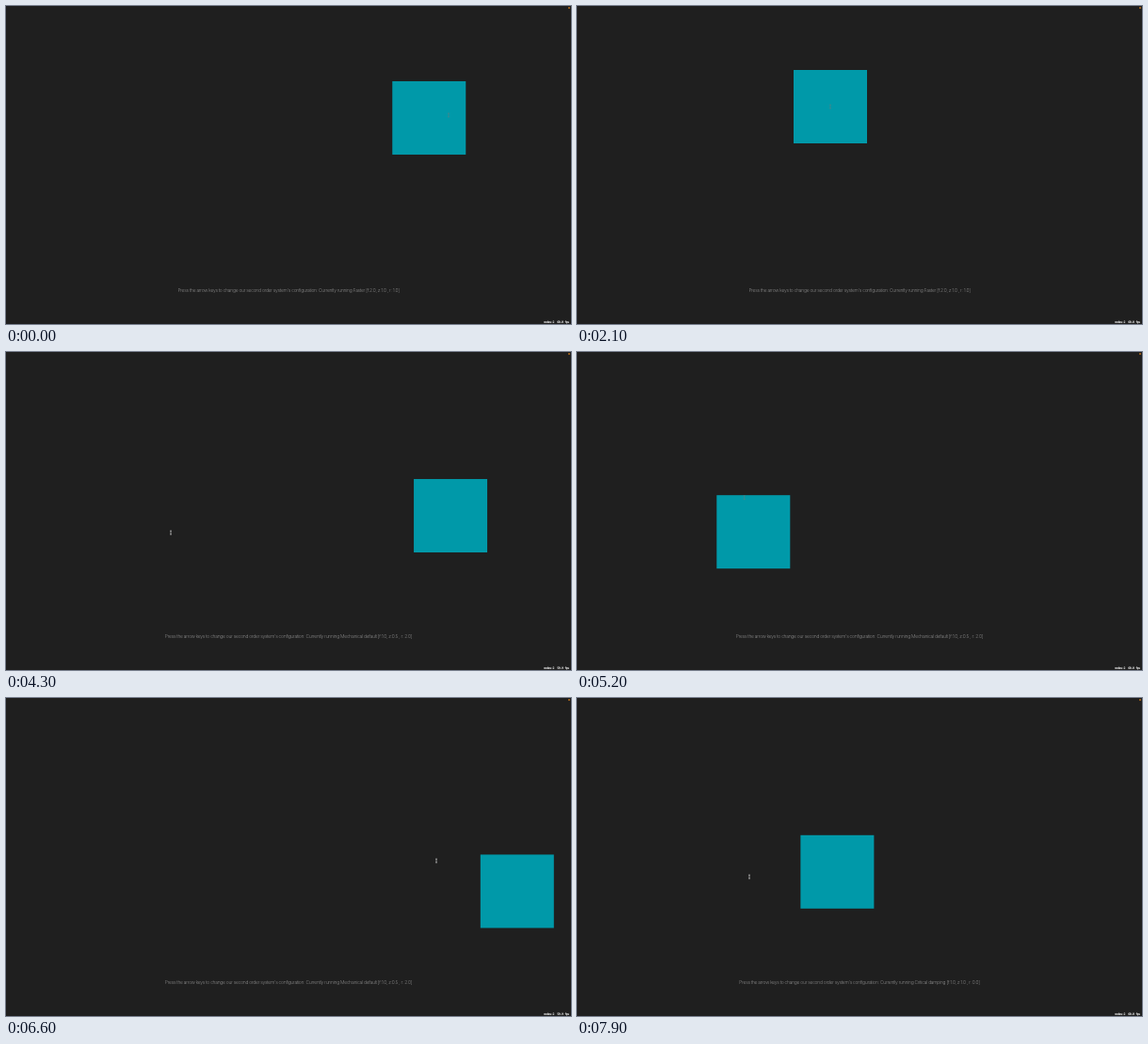
Write an HTML page that moves like this. It is 600x338 px and loops after 8 s.

```html
<!DOCTYPE html>
<html lang="en">
<head>
<meta charset="utf-8">
<title>Second order system</title>
<style>
  html, body { margin: 0; width: 100%; height: 100%; overflow: hidden; background: #1f1f1f; }
  svg { display: block; width: 100vw; height: 100vh; }
  #caption { font: 200 5px Inter, Roboto, sans-serif; letter-spacing: -0.26px; fill: #b4b4b4; text-anchor: middle; }
  #stats { font: 700 3.3px "DejaVu Sans Mono", monospace; letter-spacing: -0.4px; fill: #f4f4f4; white-space: pre; }
</style>
</head>
<body>
<svg viewBox="0 0 600 338">
  <rect width="600" height="338" fill="#1f1f1f"/>
  <circle cx="598" cy="2" r="0.9" fill="#c9761c"/>
  <text id="caption" x="300" y="304"></text>
  <rect id="box" width="78" height="78" fill="#0099a9"/>
  <path id="cursor" d="M-1 -1.9H1M0 -1.9V1.9M-1 1.9H1" fill="none" stroke-width="0.7"/>
  <text id="stats" x="571" y="336.6"></text>
</svg>
<script>
const LOOP = 8000, HALF = 39, FLICK = 28, INPUT_LAG = 30;
const $ = id => document.getElementById(id);
const clamp01 = v => Math.min(1, Math.max(0, v));

const modes = [
  { from: 0, name: 'Faster', f: 2, z: 1, r: 1 },
  { from: 2300, name: 'Mechanical default', f: 1, z: 0.5, r: 2 },
  { from: 6900, name: 'Critical damping', f: 1, z: 1, r: 0 }
];

// The pointer rests, then flicks to the next spot
const pointerStart = { x: 470, y: 116 };
const flicks = [
  { at: 635, x: 269, y: 107 },
  { at: 2976, x: 473.5, y: 174.5 },
  { at: 4272, x: 175, y: 192 },
  { at: 5170, x: 184, y: 66, span: 105 },
  { at: 6218, x: 463, y: 174.5 },
  { at: 6572, x: 457, y: 173 },
  { at: 6660, x: 473, y: 174 },
  { at: 7485, x: 183, y: 190 }
];

function pointerAt(t) {
  let { x, y } = pointerStart;
  for (const { at, span = FLICK, ...to } of flicks) {
    const k = clamp01((t - at) / span);
    x += (to.x - x) * k;
    y += (to.y - y) * k;
  }
  return [x, y];
}

const modeAt = t => modes.filter(m => m.from <= t).pop();

// Second order dynamics, integrated once at 1 ms steps
function simulate() {
  const path = [], dt = 0.001;
  const pos = [449, 119], vel = [260, -38];
  let last = pointerAt(0);
  for (let t = 0; t <= LOOP; t++) {
    path.push([...pos]);
    const { f, z, r } = modeAt(t), w = 2 * Math.PI * f;
    const target = pointerAt(t - INPUT_LAG);
    for (let a = 0; a < 2; a++) {
      const speed = (target[a] - last[a]) / dt;
      const acc = w * w * (target[a] - pos[a]) + r * z * w * speed - 2 * z * w * vel[a];
      vel[a] += acc * dt;
      pos[a] += vel[a] * dt;
    }
    last = target;
  }
  return path;
}

const path = simulate();

function render(t) {
  const [cx, cy] = path[Math.floor(t)], [px, py] = pointerAt(t);
  const { name, f, z, r } = modeAt(t);
  $('box').setAttribute('x', cx - HALF);
  $('box').setAttribute('y', cy - HALF);

  const inside = Math.abs(px - cx) < HALF && Math.abs(py - cy) < HALF;
  $('cursor').setAttribute('transform', `translate(${px} ${py})`);
  $('cursor').setAttribute('stroke', inside ? '#4f8588' : '#c4c4c4');

  $('caption').textContent = "Press the arrow keys to change our second order system's configuration: " +
    `Currently running ${name} [f:${f.toFixed(1)}, z:${z.toFixed(1)} , r: ${r.toFixed(1)}]`;
  const slow = (t >= 3800 && t < 4800) || (t >= 5900 && t < 7000);
  $('stats').textContent = `nodes:2  ${slow ? '59.9' : '60.0'} fps`;
}

const start = performance.now();
function tick() {
  render((performance.now() - start) % LOOP);
  requestAnimationFrame(tick);
}
render(0);
requestAnimationFrame(tick);
</script>
</body>
</html>
```
